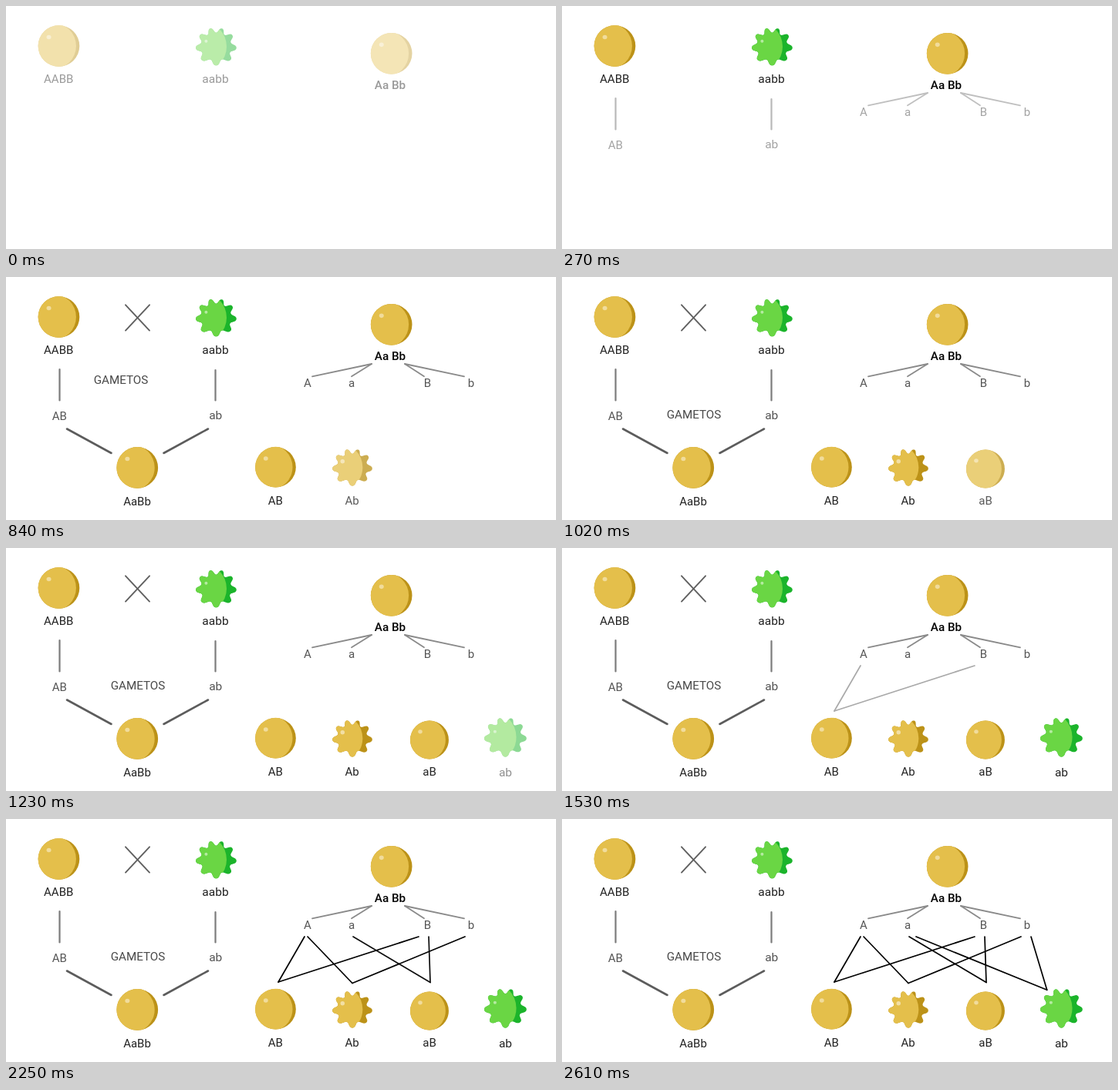
An HTML page that plays this animation: 713 px wide and 316 px high, repeating every 4710 ms.

```html
<!DOCTYPE html>
<html lang="es">
<head>
<meta charset="utf-8">
<title>Gametos</title>
<style>
html, body { margin: 0; width: 100%; height: 100%; overflow: hidden; background: #fff; }
svg { display: block; width: 713px; height: 316px; }
text { font-family: Roboto, Inter, sans-serif; text-anchor: middle; }
</style>
</head>
<body>
<svg id="stage" viewBox="0 0 713 316"></svg>
<script>
const LOOP = 4710, STEP = 30, LAST = 2610;
const NS = 'http://www.w3.org/2000/svg';
const GOLD = ['#e4bf4b', '#bc9218'], GREEN = ['#6ad644', '#1bb42b'];
const stage = document.getElementById('stage');

function add(parent, tag, attrs) {
  const el = document.createElementNS(NS, tag);
  for (const k in attrs) el.setAttribute(k, attrs[k]);
  return parent.appendChild(el);
}

// Bumpy outline: round knobs at the given angles (clockwise from the top)
function starPath() {
  const tips = [-18, 18, 54, 94, 133, 180, 227, 266, 306, 342];
  const pts = [];
  for (let i = 0; i < tips.length - 1; i++) {
    const span = tips[i + 1] - tips[i];
    for (let k = 0; k < 20; k++) {
      const u = k / 20, w = 2 * Math.PI * u;
      const a = (tips[i] + span * u) * Math.PI / 180;
      const wave = Math.cos(w) - 0.06 * Math.cos(3 * w);
      const r = 21.3 + 3.4 * wave + 1.9 * Math.sin(a) ** 2;
      pts.push((r * Math.sin(a)).toFixed(2) + ' ' + (-r * Math.cos(a)).toFixed(2));
    }
  }
  return 'M' + pts.join('L') + 'Z';
}

const outline = starPath();
const defs = add(stage, 'defs', {});
function lightSide(id, cx, r) {
  add(add(defs, 'clipPath', { id }), 'circle', { cx, r });
}
lightSide('starLight', -19, 32.6);
lightSide('ballLight', -7.5, 30);

const group = () => add(stage, 'g', {});

function ball(g, x, y, r = 26.9) {
  const b = add(g, 'g', { transform: `translate(${x} ${y}) scale(${r / 27})` });
  add(b, 'circle', { r: 26.9, fill: GOLD[1] });
  add(b, 'circle', { r: 27, fill: GOLD[0], 'clip-path': 'url(#ballLight)' });
  add(b, 'ellipse', { cx: -13, cy: -11.5, rx: 3, ry: 2.8, fill: '#f1dc9c' });
}

function star(g, x, y, [light, dark], s = 1, dot = 2) {
  const b = add(g, 'g', { transform: `translate(${x} ${y}) scale(${s})` });
  add(b, 'path', { d: outline, fill: dark });
  add(b, 'path', { d: outline, fill: light, 'clip-path': 'url(#starLight)' });
  add(b, 'circle', { cx: -13, cy: -5 - dot, r: dot, fill: '#fff', opacity: 0.5 });
}

function label(g, str, x, y, fill = '#222', size = 15, weight = 400) {
  add(g, 'text', { x, y, fill, 'font-size': size, 'font-weight': weight }).textContent = str;
}

function line(g, x1, y1, x2, y2, stroke = '#000', width = 1.7) {
  add(g, 'line', { x1, y1, x2, y2, stroke, 'stroke-width': width, 'stroke-linecap': 'round' });
}

// Parents and the hybrid
const parents = group();
ball(parents, 68.5, 52);
star(parents, 272.4, 52.8, GREEN);
label(parents, 'AABB', 68.2, 100);
label(parents, 'aabb', 271.5, 100, '#222', 15.5);

const hybrid = group();
ball(hybrid, 499.7, 61.8);
label(hybrid, 'Aa Bb', 498, 107.8, '#000', 15.2, 500);

// Alleles
const alleles = group();
line(alleles, 69.5, 120, 69.5, 160.5, '#7c7c7c', 2.2);
line(alleles, 271.5, 121, 271.5, 160.5, '#7c7c7c', 2.2);
label(alleles, 'AB', 69.2, 186.3, '#555');
label(alleles, 'ab', 271.7, 185, '#555', 15.5);
for (const [x1, x2] of [[474, 397], [474, 448], [517, 542], [517, 594]])
  line(alleles, x1, 113, x2, 129.3, '#8a8a8a', 1.8);
for (const [s, x] of [['A', 391], ['a', 448], ['B', 546.5], ['b', 603]])
  label(alleles, s, x, 143, '#555');

// Offspring and first gamete
const child = group();
line(child, 79, 197.5, 136.5, 229, '#5c5c5c', 2.6);
line(child, 262, 197.5, 204.5, 229, '#5c5c5c', 2.6);
ball(child, 170.3, 247.9);
label(child, 'AaBb', 170, 296.5);
ball(child, 349.5, 247.2, 26.4);
label(child, 'AB', 349.3, 296.2);

const cross = group();
line(cross, 155, 36.3, 186, 69.6, '#606060', 1.9);
line(cross, 186, 36.3, 155, 69.6, '#606060', 1.9);

const title = group();
label(title, 'GAMETOS', 171, 184, '#4a4a4a', 15.2);

const gameteAb = group();
star(gameteAb, 449, 247.5, GOLD, 0.98, 2.8);
label(gameteAb, 'Ab', 448.7, 296.2);

const gameteaB = group();
ball(gameteaB, 549, 249.5, 25);
label(gameteaB, 'aB', 549, 296.3);

const gameteab = group();
star(gameteab, 647.4, 246, GREEN, 1.04);
label(gameteab, 'ab', 647.5, 297, '#222', 15.5);

// Two lines, each given as [top x, bottom x], reaching down to y
function links(y, ...ends) {
  const g = group();
  for (const [top, bottom] of ends) line(g, top, 153, bottom, y);
  return g;
}

// element, start, duration
const fades = [
  [parents, -82, 180],
  [hybrid, -72, 180],
  [alleles, 173, 180],
  [child, 435, 180],
  [cross, 590, 150],
  [gameteAb, 705, 180],
  [gameteaB, 885, 180],
  [gameteab, 1140, 180],
  [links(212, [387, 353], [535, 353]), 1470, 180],
  [links(213.5, [391, 449], [595, 449]), 1735, 180],
  [links(212.5, [450, 550], [548, 550]), 2080, 180],
  [links(222.3, [459, 628.7], [608, 628.7]), 2430, 180]
];
const slide = { start: 705, time: 178, dx: -91, dy: -187 };

const progress = (t, start, time) => Math.max(0, Math.min(1, (t - start) / time));

function draw(ms) {
  const t = Math.min(LAST, Math.floor((ms % LOOP) / STEP) * STEP);
  for (const [el, start, time] of fades)
    el.setAttribute('opacity', progress(t, start, time).toFixed(3));
  const rest = 1 - progress(t, slide.start, slide.time);
  title.setAttribute('transform', `translate(${slide.dx * rest} ${slide.dy * rest})`);
  title.setAttribute('opacity', t < slide.start ? 0 : 1);
}

const begin = performance.now();
function tick() {
  draw(performance.now() - begin);
  requestAnimationFrame(tick);
}
tick();
</script>
</body>
</html>
```
